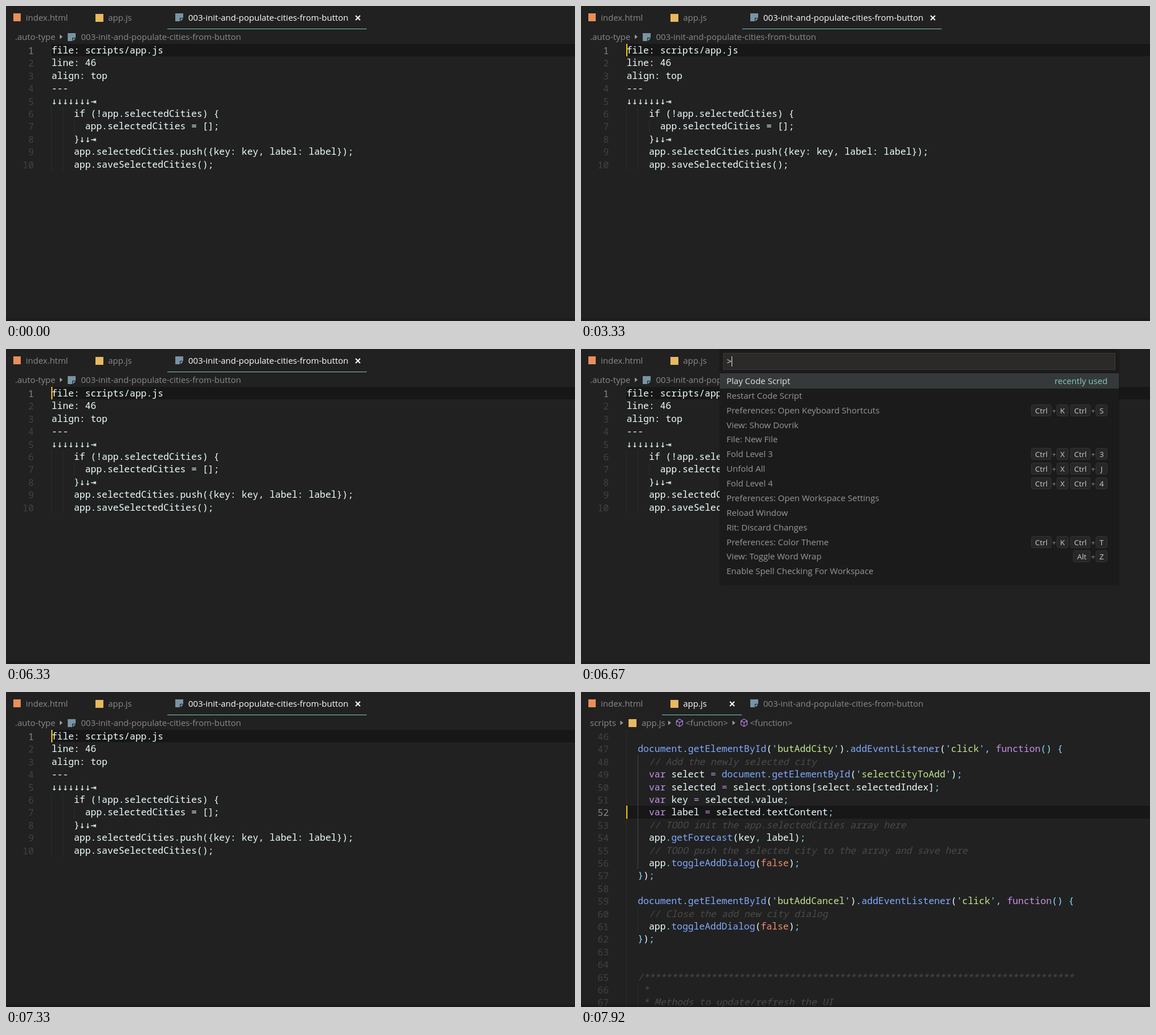
Recreate the animation shown at these times as an HTML page with a canvas. Size 1005x557 px, loop 8 s.

```html
<!DOCTYPE html>
<html lang="en">
<head>
<meta charset="utf-8">
<title>Editor</title>
<style>
  html, body { margin: 0; width: 100%; height: 100%; overflow: hidden; background: #212121; }
  canvas { display: block; width: 1005px; height: 557px; }
</style>
</head>
<body>
<canvas id="stage" width="1005" height="557"></canvas>
<script>
const ctx = document.getElementById('stage').getContext('2d', { alpha: false });

const LOOP = 8000;
const UI = '15px "Open Sans", "Noto Sans", sans-serif';
const KEY = '13.5px "Open Sans", "Noto Sans", sans-serif';
const MONO = '16.47px "Noto Sans Mono", monospace';
const ARROWS = '16.47px "DejaVu Sans Mono", monospace';
const CHAR = 9.882, LINE = 22.4, TOP = 67, LEFT = 80.4;

const C = {
  bg: '#212121', row: '#171717', text: '#eeffff', comment: '#4a4a4a', number: '#424242',
  numberOn: '#868686', keyword: '#c792ea', call: '#82aaff', punct: '#89ddff',
  string: '#c3e88d', literal: '#f78c6c', teal: '#80cbc4', caret: '#ffcc00',
  dim: '#8a8a8a', tabOn: '#ffffff', html: '#e8905a', script: '#e8b960', note: '#7894a4',
  guide: '#2d2d2d', guideOn: '#484848', symbol: '#b180d7'
};

const SCRIPT_TAB = 'app.js', NOTE_TAB = '003-init-and-populate-cities-from-button';

const note = [
  'file: scripts/app.js',
  'line: 46',
  'align: top',
  '---',
  '↓↓↓↓↓↓↓⇥',
  '    if (!app.selectedCities) {',
  '      app.selectedCities = [];',
  '    }↓↓⇥',
  '    app.selectedCities.push({key: key, label: label});',
  '    app.saveSelectedCities();'
];

const script = [
  '',
  "  document.getElementById('butAddCity').addEventListener('click', function() {",
  '    // Add the newly selected city',
  "    var select = document.getElementById('selectCityToAdd');",
  '    var selected = select.options[select.selectedIndex];',
  '    var key = selected.value;',
  '    var label = selected.textContent;',
  '    // TODO init the app.selectedCities array here',
  '    app.getForecast(key, label);',
  '    // TODO push the selected city to the array and save here',
  '    app.toggleAddDialog(false);',
  '  });',
  '',
  "  document.getElementById('butAddCancel').addEventListener('click', function() {",
  '    // Close the add new city dialog',
  '    app.toggleAddDialog(false);',
  '  });',
  '',
  '',
  '  /' + '*'.repeat(77),
  '   *',
  '   * Methods to update/refresh the UI'
];

const commands = [
  ['Play Code Script'],
  ['Restart Code Script'],
  ['Preferences: Open Keyboard Shortcuts', 'Ctrl', 'K', 'Ctrl', 'S'],
  ['View: Show Dovrik'],
  ['File: New File'],
  ['Fold Level 3', 'Ctrl', 'X', 'Ctrl', '3'],
  ['Unfold All', 'Ctrl', 'X', 'Ctrl', 'J'],
  ['Fold Level 4', 'Ctrl', 'X', 'Ctrl', '4'],
  ['Preferences: Open Workspace Settings'],
  ['Reload Window'],
  ['Rit: Discard Changes'],
  ['Preferences: Color Theme', 'Ctrl', 'K', 'Ctrl', 'T'],
  ['View: Toggle Word Wrap', 'Alt', 'Z'],
  ['Enable Spell Checking For Workspace']
];

const blinks = [330, 830, 1330, 1830, 2500, 2750, 3330, 3750, 4330, 4750, 5330, 5830, 6330];

function rect(x, y, w, h, color) {
  ctx.fillStyle = color;
  ctx.fillRect(x, y, w, h);
}

function label(str, x, y, color, font = UI, align = 'left') {
  ctx.font = font;
  ctx.textAlign = align;
  ctx.fillStyle = color;
  ctx.fillText(str, x, y);
}

function poly(color, ...points) {
  ctx.fillStyle = color;
  ctx.beginPath();
  points.forEach(([x, y]) => ctx.lineTo(x, y));
  ctx.fill();
}

function box(x, y, w, h, fill, stroke, radius = 0) {
  ctx.beginPath();
  ctx.roundRect(x + .5, y + .5, w - 1, h - 1, radius);
  ctx.fillStyle = fill;
  ctx.fill();
  ctx.strokeStyle = stroke;
  ctx.lineWidth = 1;
  ctx.stroke();
}

function noteIcon(x, y) {
  poly(C.note, [x, y], [x + 14, y], [x + 14, y + 9], [x + 9, y + 14], [x, y + 14]);
  poly(C.bg, [x + 8, y + 14], [x + 8, y + 8], [x + 14, y + 8], [x + 14, y + 9],
    [x + 9.3, y + 9.3], [x + 9.3, y + 14]);
  poly(C.note, [x + 9.5, y + 13.5], [x + 9.5, y + 9.5], [x + 13.5, y + 9.5]);
}

function cubeIcon(x, y) {
  ctx.strokeStyle = C.symbol;
  ctx.lineWidth = 1.2;
  ctx.beginPath();
  ctx.moveTo(x, y - 6.5);
  [[5.5, -3.5], [5.5, 3.2], [0, 6.5], [-5.5, 3.2], [-5.5, -3.5]]
    .forEach(([dx, dy]) => ctx.lineTo(x + dx, y + dy));
  ctx.closePath();
  ctx.moveTo(x - 5.5, y - 3.5);
  ctx.lineTo(x, y - .4);
  ctx.lineTo(x + 5.5, y - 3.5);
  ctx.moveTo(x, y - .4);
  ctx.lineTo(x, y + 6.5);
  ctx.stroke();
}

function chevron(x) {
  poly('#9a9a9a', [x - 2.5, 50.5], [x + 2.5, 54.5], [x - 2.5, 58.5]);
}

function closeIcon(x) {
  ctx.strokeStyle = C.tabOn;
  ctx.lineWidth = 2;
  ctx.beginPath();
  ctx.moveTo(x - 4, 17);
  ctx.lineTo(x + 4, 25);
  ctx.moveTo(x + 4, 17);
  ctx.lineTo(x - 4, 25);
  ctx.stroke();
}

function drawTabs(scriptOpen) {
  rect(13, 13, 13, 14, C.html);
  label('index.html', 35, 26, C.dim);
  rect(158, 14, 14, 14, C.script);
  label(SCRIPT_TAB, 180.5, 26, scriptOpen ? C.tabOn : C.dim);
  noteIcon(299, 13);
  label(NOTE_TAB, 322, 26, scriptOpen ? C.dim : C.tabOn);
  closeIcon(scriptOpen ? 267 : 621.5);
  if (scriptOpen) rect(143, 40, 141, 1, C.teal);
  else rect(285, 40, 352, 1, C.teal);
}

function drawCrumbs(scriptOpen, symbols) {
  if (!scriptOpen) {
    label('.auto-type', 16, 60, C.dim);
    chevron(97.5);
    noteIcon(109, 48);
    label(NOTE_TAB, 132.5, 60, C.dim);
    return;
  }
  label('scripts', 16, 60, C.dim);
  chevron(72);
  rect(84, 48, 14, 14, C.script);
  label(SCRIPT_TAB, 107, 60, C.dim);
  chevron(156.5);
  if (!symbols) {
    label('…', 167, 60, C.dim);
    return;
  }
  cubeIcon(174, 54.5);
  label('<function>', 184.5, 60, C.dim);
  chevron(270);
  cubeIcon(288, 54.5);
  label('<function>', 298.5, 60, C.dim);
}

const lineTop = i => Math.round(TOP + i * LINE);
const baseline = i => Math.round(84 + i * LINE);

function guide(level, from, to, color = C.guide) {
  const y = lineTop(from);
  rect(Math.round(LEFT + level * 2 * CHAR), y, 1, lineTop(to + 1) - y, color);
}

function drawPlain(line, i) {
  for (const run of line.matchAll(/[↓⇥]+|[^↓⇥\s][^↓⇥]*/g)) {
    const font = /[↓⇥]/.test(run[0]) ? ARROWS : MONO;
    label(run[0], LEFT + run.index * CHAR, baseline(i), C.text, font);
  }
}

const TOKEN = /'|\b(?:var|function)\b|\bfalse\b|\w+|\(\)|\s+|[.,;{}=]|./g;

function tokenColor(token, quoted, next) {
  if (token === "'") return C.punct;
  if (quoted) return C.string;
  if (/^(var|function|=)$/.test(token)) return C.keyword;
  if (token === 'false') return C.literal;
  if (token === 'document' || /^\w/.test(token) && next === '(') return C.call;
  return /^(\(\)|[.,;{}])$/.test(token) ? C.punct : C.text;
}

function drawCode(line, i) {
  const indent = line.search(/\S/);
  if (indent < 0) return;
  if (/^\s*(\/|\*)/.test(line)) {
    label(line.trim(), LEFT + indent * CHAR, baseline(i), C.comment, 'italic ' + MONO);
    return;
  }
  let quoted = false;
  for (const m of line.matchAll(TOKEN)) {
    const token = m[0];
    if (token === "'") quoted = !quoted;
    const color = tokenColor(token, quoted, line[m.index + token.length]);
    if (token.trim()) label(token, LEFT + m.index * CHAR, baseline(i), color, MONO);
  }
}

function drawEditor(lines, first, active, caretOn, scriptOpen) {
  const y = lineTop(active);
  rect(80, y, 925, lineTop(active + 1) - y, C.row);
  if (scriptOpen) {
    guide(0, 0, 21);
    guide(1, 2, 10, active < 11 ? C.guideOn : C.guide);
    guide(1, 14, 15);
    guide(1, 20, 21, active > 19 ? C.guideOn : C.guide);
  } else {
    guide(0, 5, 9);
    guide(1, 5, 9);
    guide(2, 6, 6);
  }
  lines.forEach((line, i) => {
    label(first + i, 49, baseline(i) + 1, i === active ? C.numberOn : C.number, MONO, 'right');
    (scriptOpen ? drawCode : drawPlain)(line, i);
  });
  if (caretOn) rect(80, y, 2, lineTop(active + 1) - y, C.caret);
}

function keycap(str, x, w, y) {
  box(x, y - 11, w, 21, '#272727', '#343434', 3);
  label(str, x + w / 2, y + 4.5, '#cccccc', KEY, 'center');
}

function chord(mod, key, right, y) {
  const modWidth = mod === 'Alt' ? 31 : 36;
  keycap(key, right - 21, 21, y);
  label('+', right - 25.5, y + 5, '#8c8c8c', KEY, 'center');
  keycap(mod, right - 30 - modWidth, modWidth, y);
}

function drawPalette(t) {
  ctx.save();
  ctx.shadowColor = 'rgba(0,0,0,.25)';
  ctx.shadowBlur = 3;
  rect(245, 0, 705, 417, '#1b1b1b');
  ctx.restore();

  box(251, 7, 693, 30, '#2b2a29', '#3a3a3a');
  label('>', 257.5, 27, '#e8e8e8');
  if (t < 7080) rect(266, 13, 1, 18, '#eeeeee');

  rect(245, 43, 705, 27, '#36393a');
  // the scrollbar slider fades in
  const slider = t < 7080 ? 0 : t < 7170 ? .05 : .1;
  rect(939, 43, 11, 24, `rgba(255,255,255,${slider})`);

  commands.forEach(([name, ...keys], i) => {
    const y = Math.round(57 + i * 25.87);
    label(name, 257, y + 5, i ? '#989898' : '#e4e4e4');
    if (keys.length) chord(...keys.slice(-2), 930, y);
    if (keys.length > 2) chord(keys[0], keys[1], 861, y);
  });
  label('recently used', 930, 62, C.teal, UI, 'right');
}

function noteCaret(t) {
  if (t >= 6670) return t >= 7330;
  return blinks.filter(time => time <= t).length % 2 === 1;
}

function scriptLine(t) {
  if (t < 7670) return 21;
  if (t < 7750) return 3;
  return t < 7920 ? 4 : 6;
}

function draw(t) {
  const scriptOpen = t >= 7500;
  rect(0, 0, 1005, 557, C.bg);
  drawTabs(scriptOpen);
  drawCrumbs(scriptOpen, t >= 7750);
  if (scriptOpen) drawEditor(script, 46, scriptLine(t), true, true);
  else drawEditor(note, 1, 0, noteCaret(t), false);
  rect(0, 552, 1005, 5, 'rgba(0,0,0,.16)');
  if (t >= 6670 && t < 7330) drawPalette(t);
}

const start = performance.now();
function tick() {
  draw((performance.now() - start) % LOOP);
  requestAnimationFrame(tick);
}
tick();
</script>
</body>
</html>
```
